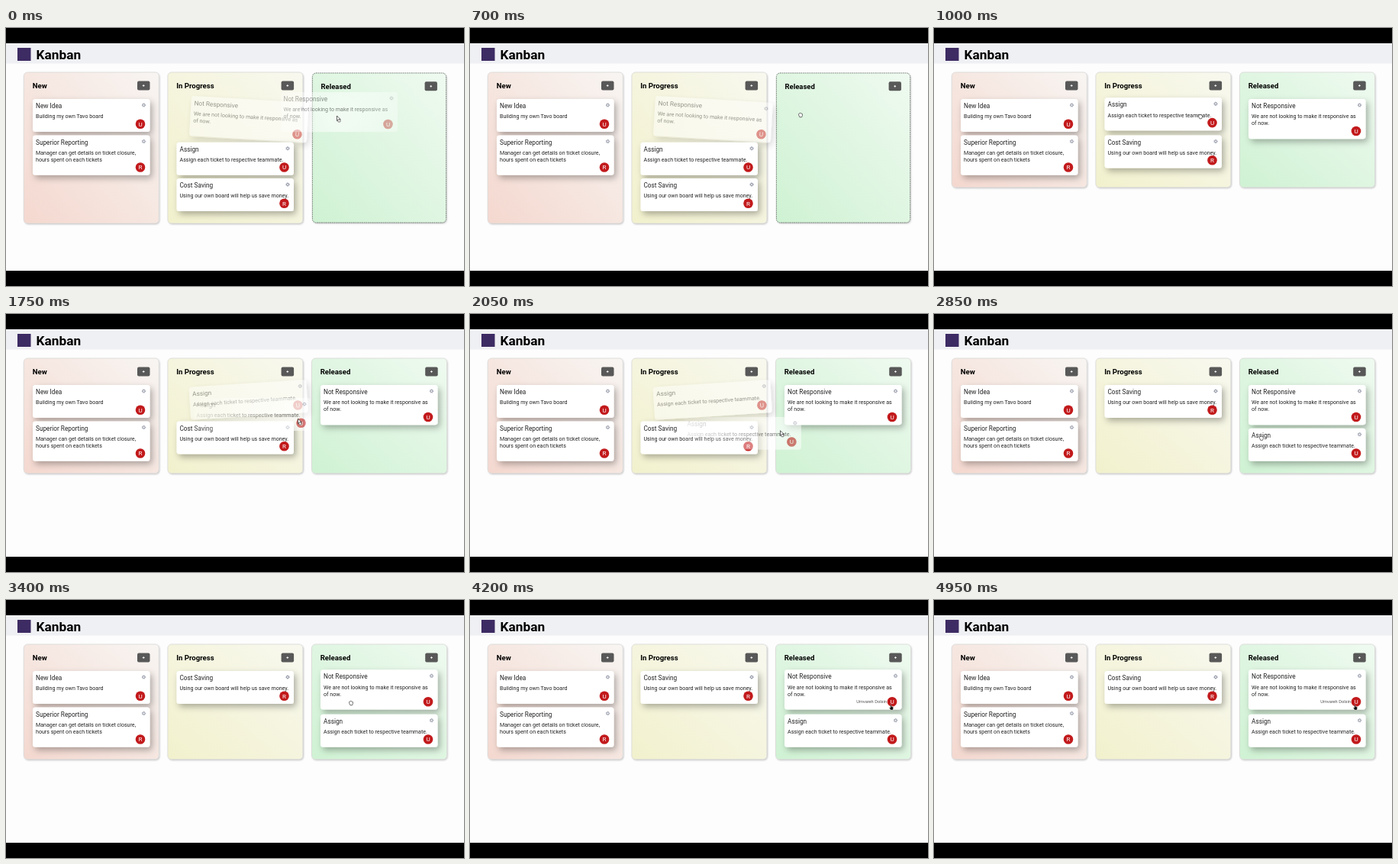
An HTML page that plays this animation: 600x338 px, repeating every 5000 ms.

```html
<!DOCTYPE html>
<html lang="en">
<head>
<meta charset="utf-8">
<title>Kanban</title>
<style>
  html, body { margin: 0; width: 100%; height: 100%; overflow: hidden; background: #000; }
  svg { display: block; width: 600px; height: 338px; font-family: Roboto, sans-serif; }
  .heading { font-size: 17.3px; font-weight: 700; }
  .column-title { font-size: 9.6px; font-weight: 700; }
  .card-title { font-size: 8.25px; fill: #222; }
  .card-text { font-size: 7.1px; fill: #222; }
  .initial { font-size: 8px; fill: #fff; text-anchor: middle; }
  .tooltip { font-size: 5.7px; fill: #555; text-anchor: end; }
</style>
</head>
<body>
<svg viewBox="0 0 600 338" xmlns="http://www.w3.org/2000/svg">
  <defs>
    <filter id="cardShadow" x="-20%" y="-30%" width="150%" height="190%">
      <feDropShadow dx="3" dy="4" stdDeviation="4" flood-color="#000" flood-opacity=".3"/>
    </filter>
    <filter id="columnShadow" x="-10%" y="-10%" width="120%" height="120%">
      <feDropShadow dx="1" dy="1.2" stdDeviation="1.2" flood-color="#000" flood-opacity=".24"/>
    </filter>
  </defs>
  <rect width="600" height="338"/>
  <rect y="20" width="600" height="298" fill="#fdfdfe"/>
  <rect y="20" width="600" height="26.5" fill="#eff0f3"/>
  <rect x="15" y="26" width="17.5" height="17" fill="#3d2b63"/>
  <text class="heading" x="39.5" y="40.6">Kanban</text>
  <g id="columns"></g>
  <g id="cards"></g>
  <g id="ghosts"></g>
  <text id="tooltip" class="tooltip" x="546" y="134.7">Umvareh Dolsin</text>
  <g id="cursor"></g>
</svg>
<script>
const LOOP = 5000, STEP = 50;
const DROP_1 = 800, DROP_2 = 2700;
const COL_W = 177, CARD_W = 153.5, COL_TOP = 58;
const SLOT = [35, 223.5, 412];

const $ = id => document.getElementById(id);
const between = (t, a, b) => t >= a && t < b;

function add(parent, markup) {
  const g = document.createElementNS('http://www.w3.org/2000/svg', 'g');
  g.innerHTML = markup;
  parent.append(g);
  return g;
}

// Linear interpolation over rows of [time, ...values].
function track(rows, t) {
  if (t <= rows[0][0]) return rows[0].slice(1);
  for (let i = 1; i < rows.length; i++) {
    const a = rows[i - 1], b = rows[i];
    if (t <= b[0]) {
      const k = (t - a[0]) / (b[0] - a[0]);
      return a.slice(1).map((v, j) => v + (b[j + 1] - v) * k);
    }
  }
  return rows[rows.length - 1].slice(1);
}

function makeColumn(name, i, dark, light) {
  const x = 23 + i * 188.6;
  return add($('columns'), `
    <linearGradient id="tint${i}" x1="0" y1="1" x2="1" y2="0">
      <stop stop-color="${dark}"/><stop offset="1" stop-color="${light}"/>
    </linearGradient>
    <rect class="box" x="${x + .3}" y="${COL_TOP}" width="${COL_W}" rx="5"
      fill="url(#tint${i})" filter="url(#columnShadow)"/>
    <rect class="edge" x="${x + .3}" y="${COL_TOP}" width="${COL_W}" rx="5" fill="none" stroke-width=".8"/>
    <text class="column-title" x="${SLOT[i] - .3}" y="79">${name}</text>
    <rect x="${x + 149}" y="69.5" width="16.5" height="12" rx="2" fill="#585858"/>
    <path d="M${x + 155.8} 75.5h2.8m-1.4-1.4v2.8" stroke="#fff" stroke-width=".9"/>`);
}

function cardMarkup({ title, lines, who, h }, shadow = true) {
  const text = lines.map((s, i) =>
    `<text class="card-text" x="4" y="${25.3 + i * 9}">${s}</text>`).join('');
  return `
    <rect width="${CARD_W}" height="${h}" rx="3.5" fill="#fff" ${shadow ? 'filter="url(#cardShadow)"' : ''}/>
    <text class="card-title" x="4" y="12">${title}</text>${text}
    <circle cx="145.5" cy="8" r="1.5" fill="none" stroke="#8b90a0" stroke-width="1"/>
    <circle cx="145.5" cy="8" r="2.3" fill="none" stroke="#8b90a0" stroke-width=".8" stroke-dasharray=".9 .9"/>
    <circle cx="141" cy="${h - 10.2}" r="6.3" fill="#c21a1c"/>
    <text class="initial" x="141" y="${h - 7.3}">${who}</text>`;
}

const makeCard = data => add($('cards'), cardMarkup(data));

// Drag image that fades out away from the grab point.
function makeGhost(data, gx, gy, id) {
  return add($('ghosts'), `
    <radialGradient id="fade${id}" gradientUnits="userSpaceOnUse" cx="${gx}" cy="${gy}" r="135">
      <stop stop-color="#fff" stop-opacity=".62"/><stop offset=".5" stop-color="#fff" stop-opacity=".36"/>
      <stop offset="1" stop-color="#fff" stop-opacity=".1"/>
    </radialGradient>
    <mask id="mask${id}" maskUnits="userSpaceOnUse" x="0" y="0" width="160" height="60">
      <rect width="160" height="60" fill="url(#fade${id})"/>
    </mask>
    <g mask="url(#mask${id})">${cardMarkup(data, false)}</g>`);
}

const data = {
  idea: { title: 'New Idea', lines: ['Building my own Tavo board'], who: 'U', h: 43 },
  report: { title: 'Superior Reporting', who: 'R', h: 52.2,
    lines: ['Manager can get details on ticket closure,', 'hours spent on each tickets'] },
  responsive: { title: 'Not Responsive', who: 'U', h: 52.2,
    lines: ['We are not looking to make it responsive as', 'of now.'] },
  assign: { title: 'Assign', lines: ['Assign each ticket to respective teammate.'], who: 'U', h: 43 },
  saving: { title: 'Cost Saving', lines: ['Using our own board will help us save money.'], who: 'R', h: 43 }
};

const columns = [
  makeColumn('New', 0, '#f4d8cf', '#f8f5f2'),
  makeColumn('In Progress', 1, '#f2f1cd', '#f8f8ef'),
  makeColumn('Released', 2, '#cff2d3', '#effaf0')
];
const cards = {};
for (const key in data) cards[key] = makeCard(data[key]);
const ghosts = [
  makeGhost(data.responsive, 75.5, 35, 0),
  makeGhost(data.assign, 130, 27, 1)
];

const shapes = {
  arrow: `<path d="M-1.5-4v6.6l1.6-1.4 1 2.3 1.1-.5-1-2.2h2z" fill="#fff" stroke="#222" stroke-width=".7"/>
    <rect x="-.2" y="1" width="3.2" height="3" rx=".6" fill="#fff" stroke="#444" stroke-width=".7"/>`,
  grab: `<path d="M-2.3.2v-1.6q.6-1.4 1.3-.5.5-1.3 1.2-.2.8-.8 1.2.3 1-.3 1 .8V.8L1.6 2.8h-2.7z"
    fill="#fff" stroke="#333" stroke-width=".7" stroke-linejoin="round"/>`,
  point: `<path d="M-1.2-3.4q.7-.8 1.2 0v2l2 .5q.8.3.6 1.2L2 3h-3L-2.7.2q.3-.8 1.5 0z"
    fill="#111" stroke="#fff" stroke-width=".3"/>`
};

const cursorPath = [
  [0, 435, 119], [550, 435, 119], [600, 433, 114], [800, 433, 114], [950, 349, 116],
  [1550, 349, 116], [1650, 362, 122], [1750, 384, 141], [2150, 416, 162], [2500, 424, 167],
  [2800, 426, 166], [3250, 452, 135], [3700, 452, 135], [4200, 552, 141]
];
const ghostPath = [
  [1650, 223.5, 91.5], [1750, 245.5, 110], [2150, 292, 143], [2500, 302, 147.5], [2600, 304, 147]
];
const assignLift = [[900, 0], [1000, -1.7]];
const responsiveLift = [[3150, 0], [3300, -1.7]];
const assignTilt = [[1600, 0], [1700, 1]];

function place(card, x, y, prefix = '') {
  card.setAttribute('transform', `${prefix} translate(${x} ${y})`);
  card.setAttribute('opacity', 1);
}

function tilt(card, h, x, y, k, dx, dy, angle) {
  card.setAttribute('transform',
    `translate(${x + dx * k} ${y + dy * k}) rotate(${angle * k} ${CARD_W / 2} ${h / 2})`);
  card.setAttribute('opacity', 1 - .55 * k);
}

function drawColumns(t, over) {
  const h = t < DROP_1 ? 198 : 150.8;
  const mid = COL_TOP + h / 2;
  const shrink = over ? `translate(489 ${mid}) scale(.99) translate(-489 ${-mid})` : '';
  columns.forEach((col, i) => {
    const active = over && i === 2;
    col.querySelector('.box').setAttribute('height', h);
    const edge = col.querySelector('.edge');
    edge.setAttribute('height', h);
    edge.setAttribute('stroke', active ? '#4a554c' : '#d9d9d6');
    edge.setAttribute('stroke-dasharray', active ? '1.5 1' : 'none');
    col.setAttribute('transform', active ? shrink : '');
  });
  return shrink;
}

function drawCards(t, shrink) {
  const [, mid, right] = SLOT;
  place(cards.idea, SLOT[0], 93);
  place(cards.report, SLOT[0], 140.5);

  if (t < DROP_1) tilt(cards.responsive, 52.2, mid, 93, 1, 18, .5, 3.4);
  else place(cards.responsive, right, 93 + track(responsiveLift, t)[0], shrink);

  if (t < DROP_1) place(cards.assign, mid, 149.7);
  else if (t < DROP_2) {
    const k = track(assignTilt, t)[0];
    tilt(cards.assign, 43, mid, 93 + track(assignLift, t)[0], k, 17.3, -.4, -3.7);
  } else place(cards.assign, right, 149.7);

  place(cards.saving, mid, t < DROP_1 ? 197 : t < DROP_2 ? 140.5 : 93);
}

let shape;
function drawCursor(t) {
  const next = t < 600 || between(t, 1650, 2600) ? 'arrow' : t >= 4150 ? 'point' : 'grab';
  if (next !== shape) $('cursor').innerHTML = shapes[shape = next];
  const [x, y] = track(cursorPath, t);
  $('cursor').setAttribute('transform', `translate(${x} ${y})`);
}

function showGhost(ghost, visible, x, y) {
  ghost.setAttribute('visibility', visible ? 'visible' : 'hidden');
  ghost.setAttribute('transform', `translate(${x} ${y})`);
}

function draw(t) {
  const over = t < DROP_1 || between(t, 2100, DROP_2);
  drawCards(t, drawColumns(t, over));
  showGhost(ghosts[0], t < 600, 359.5, 84);
  showGhost(ghosts[1], between(t, 1650, 2600), ...track(ghostPath, t));
  $('tooltip').setAttribute('visibility', t >= 4200 ? 'visible' : 'hidden');
  drawCursor(t);
}

const start = performance.now();
function tick() {
  const t = (performance.now() - start) % LOOP;
  draw(Math.floor(t / STEP) * STEP);
  requestAnimationFrame(tick);
}
tick();
</script>
</body>
</html>
```
